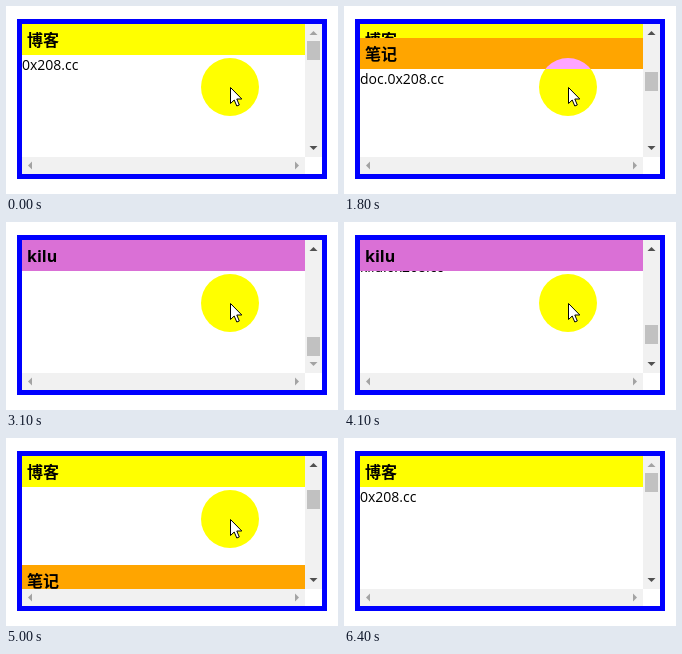
Write an HTML page with a canvas that moves like this. It is 332 by 188 pixels and loops after 7 s.

```html
<!DOCTYPE html>
<html lang="zh">
<head>
<meta charset="utf-8">
<style>
html, body { margin: 0; width: 100%; height: 100%; overflow: hidden; background: #fff; }
canvas { display: block; }
</style>
</head>
<body>
<canvas id="stage" width="332" height="188"></canvas>
<script>
const ctx = document.getElementById('stage').getContext('2d');

const LOOP = 7000, STEP = 100;
const VIEW = { x: 16, y: 18, w: 283, h: 133 };
const BAR = 17, HEADER = 31, SECTION = 231, MAX_SCROLL = 3 * SECTION - VIEW.h;
const THUMB = 19, THUMB_RANGE = 80;

const sections = [
  { title: '博客', color: '#ff0', text: '0x208.cc' },
  { title: '笔记', color: '#ffa500', text: 'doc.0x208.cc' },
  { title: 'kilu', color: '#da70d6', text: 'kilu.0x208.cc' },
];

// Wheel notches: [start ms, scroll distance]
const NOTCH_TIME = 200;
const notches = [
  [900, 100], [1448, 100], [1748, 100], [2250, 100], [2550, 100], [2850, 60],
  [3950, -100], [4211, -100], [4400, -100], [4750, -100], [4916, -100], [5160, -60],
];

const clamp = v => Math.min(1, Math.max(0, v));
const smooth = v => v * v * (3 - 2 * v);

function scrollAt(t) {
  return Math.round(notches.reduce(
    (sum, [start, delta]) => sum + delta * smooth(clamp((t - start) / NOTCH_TIME)), 0));
}

function rect(x, y, w, h, color) {
  ctx.fillStyle = color;
  ctx.fillRect(x, y, w, h);
}

function label(text, x, y, font) {
  ctx.fillStyle = '#000';
  ctx.font = font + ' "Open Sans", "Noto Sans CJK SC", "Noto Sans CJK", sans-serif';
  ctx.fillText(text, x, y);
}

function polygon(points) {
  ctx.beginPath();
  points.forEach(([x, y]) => ctx.lineTo(x, y));
  ctx.closePath();
}

function arrow(x, y, angle, enabled) {
  ctx.save();
  ctx.translate(x, y);
  ctx.rotate(angle);
  polygon([[-4, 2], [0, -2], [4, 2]]);
  ctx.fillStyle = enabled ? '#505050' : '#a3a3a3';
  ctx.fill();
  ctx.restore();
}

function drawContent(scroll) {
  const { x, y, w, h } = VIEW;
  ctx.save();
  ctx.beginPath();
  ctx.rect(x, y, w, h);
  ctx.clip();
  sections.forEach((s, i) =>
    label(s.text, x, y + i * SECTION - scroll + 46, '14px'));
  sections.forEach((s, i) => {
    const top = y + Math.max(0, i * SECTION - scroll);
    rect(x, top, w, HEADER, s.color);
    label(s.title, x + 5, top + 22, 'bold 16px');
  });
  ctx.restore();
}

function drawScrollbars(scroll) {
  const right = VIEW.x + VIEW.w, bottom = VIEW.y + VIEW.h;
  rect(right, VIEW.y, BAR, VIEW.h, '#f1f1f1');
  rect(VIEW.x, bottom, VIEW.w, BAR, '#f1f1f1');
  const thumbY = VIEW.y + BAR + Math.round(scroll / MAX_SCROLL * THUMB_RANGE);
  rect(right + 2, thumbY, 13, THUMB, '#c1c1c1');
  arrow(right + 8.5, VIEW.y + 9, 0, scroll > 0);
  arrow(right + 8.5, bottom - 9, Math.PI, scroll < MAX_SCROLL);
  arrow(VIEW.x + 8, bottom + 8.5, -Math.PI / 2, false);
  arrow(right - 8, bottom + 8.5, Math.PI / 2, false);
}

function drawPointer(t) {
  const leave = Math.max(0, (t - 5900) / 400) ** 2;
  ctx.save();
  ctx.translate(224 + 75 * leave, 81 + 104 * leave);

  // The highlight inverts blue
  ctx.globalCompositeOperation = 'difference';
  ctx.fillStyle = '#00f';
  ctx.beginPath();
  ctx.arc(0, 0, 29, 0, 2 * Math.PI);
  ctx.fill();

  ctx.globalCompositeOperation = 'source-over';
  polygon([[.5, .5], [.5, 16.5], [4.2, 13], [6.8, 19], [9.3, 18], [6.8, 12], [11.8, 12]]);
  ctx.fillStyle = '#fff';
  ctx.fill();
  ctx.strokeStyle = '#000';
  ctx.lineWidth = 1;
  ctx.stroke();
  ctx.restore();
}

function draw(now) {
  const t = Math.floor(now % LOOP / STEP) * STEP;
  const scroll = scrollAt(t);
  rect(0, 0, 332, 188, '#fff');
  rect(11, 13, 310, 160, '#00f');
  rect(16, 18, 300, 150, '#fff');
  drawContent(scroll);
  drawScrollbars(scroll);
  drawPointer(t);
  requestAnimationFrame(draw);
}
draw(0);
</script>
</body>
</html>
```
